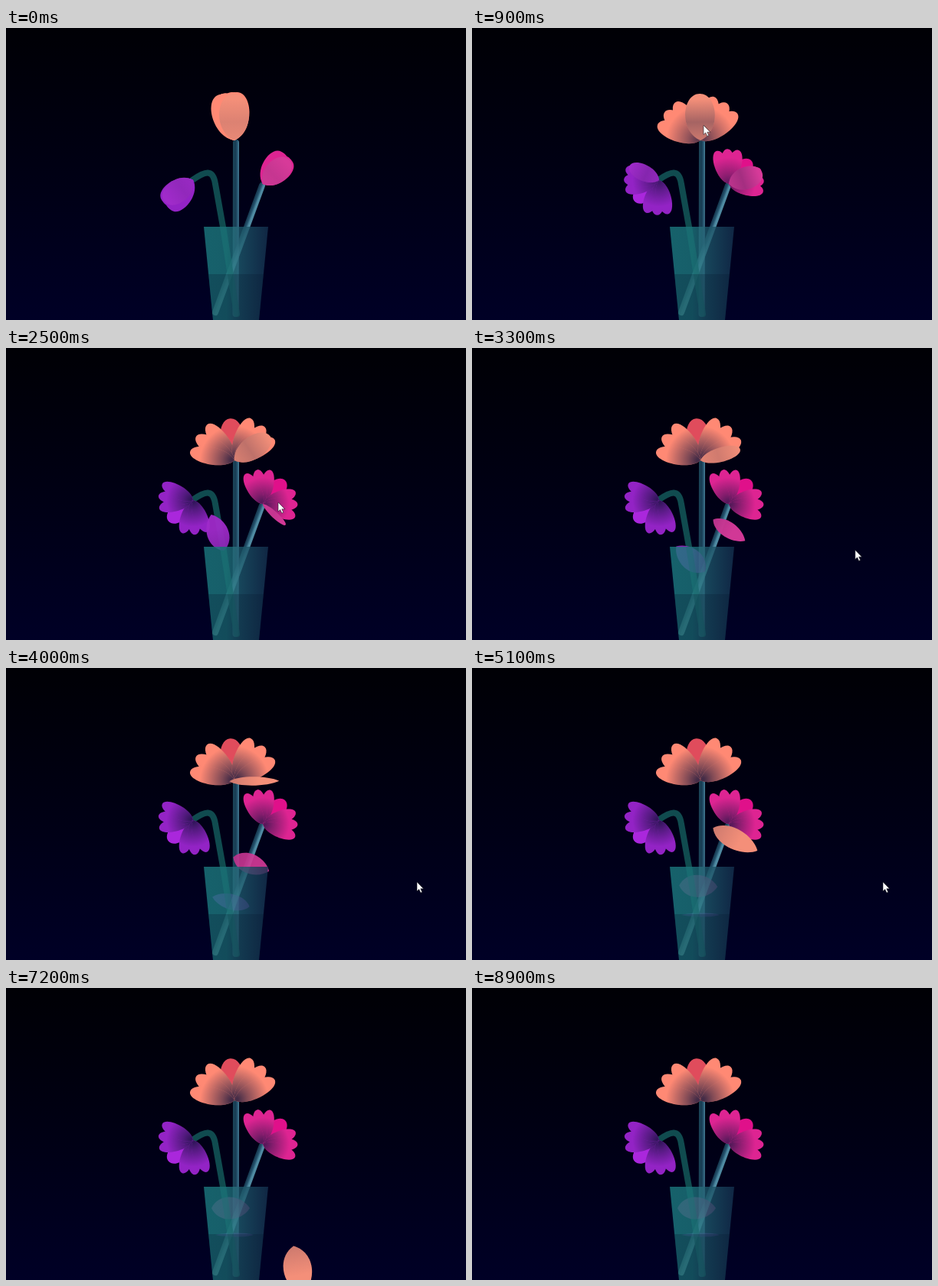
Write an HTML page with a canvas that moves like this. It is 600x382 px and loops after 9 s.

```html
<!DOCTYPE html>
<html lang="en">
<head>
<meta charset="utf-8">
<title>Flowers in a vase</title>
<style>
html, body { margin: 0; width: 100%; height: 100%; overflow: hidden; background: #000; }
canvas { display: block; }
</style>
</head>
<body>
<canvas id="stage" width="600" height="382"></canvas>
<script>
const ctx = document.getElementById('stage').getContext('2d');
const LOOP = 9000, STEP = 100, RAD = Math.PI / 180;
const clamp = v => Math.max(0, Math.min(1, v));
const mix = (a, b, p) => a + (b - a) * p;
const mixPoint = (a, b, p) => a.map((v, i) => mix(v, b[i], p));

// fall: centre and tilt at both ends; turns: half turns about the petal's long axis
const FLOWERS = [
  {
    x: 244, y: 199, axis: -133, size: .77,
    rgb: '147,35,197', back: '#aa27dc', bud: '#a02bca', dark: '42,20,82',
    fall: { from: [262, 190, 25], to: [298, 323, -90], time: 3100, turns: 1 }
  },
  {
    x: 335, y: 204, axis: 41, size: .77,
    rgb: '222,36,146', back: '#e0108a', bud: '#d73a99', dark: '72,24,84',
    fall: { from: [351, 220, 136], to: [293, 288, 90], time: 2600, turns: .5 }
  },
  {
    x: 298, y: 147, axis: -8, size: 1,
    rgb: '255,137,116', back: '#e04c5c', bud: '#f48f79', dark: '48,34,66',
    fall: { from: [322, 141, 87], to: [395, 425, 190], time: 4100, turns: .5 }
  }
];
// The flowers shed their front petals one after the other.
FLOWERS.forEach((f, i) => {
  f.loosen = 300 * (i + 1);
  f.release = 1300 * (i + 1);
});

const POINTER = [
  { t: 500, at: [302, 127] }, { t: 1400, at: [302, 128] }, { t: 2500, at: [355, 202] },
  { t: 3500, at: [536, 280] }, { t: 5600, at: [536, 280] }, { t: 6200, at: [327, 181] },
  { t: 6800, at: [34, 60] }, { t: 7100, at: [115, 5] }
];

function linear(x0, y0, x1, y1, ...stops) {
  const g = ctx.createLinearGradient(x0, y0, x1, y1);
  stops.forEach(([at, color]) => g.addColorStop(at, color));
  return g;
}

function petal(angle, w, len, tip, ...fills) {
  ctx.save();
  ctx.rotate(angle * RAD);
  ctx.beginPath();
  ctx.moveTo(0, 0);
  ctx.bezierCurveTo(-w * .72, -len * .2, -w * .6, -len * tip, 0, -len);
  ctx.bezierCurveTo(w * .6, -len * tip, w * .72, -len * .2, 0, 0);
  for (const fill of fills) {
    ctx.fillStyle = fill;
    ctx.fill();
  }
  ctx.restore();
}

function flower(f, t) {
  const open = 1 - Math.pow(1 - clamp(t / 1800), 2.7);
  const spread = mix(.16, 1, open);
  const w = mix(35, 23, open), len = mix(63, 59, open);
  ctx.save();
  ctx.translate(f.x, f.y);
  ctx.scale(f.size, f.size);
  ctx.rotate(f.axis * RAD);

  petal(2, 31, 55, 1, f.back);
  const glow = ctx.createRadialGradient(0, -3, 2, 0, -3, 42);
  glow.addColorStop(0, `rgba(${f.dark},${.9 * open})`);
  glow.addColorStop(.3, `rgba(${f.dark},${.6 * open})`);
  glow.addColorStop(1, `rgba(${f.dark},0)`);
  for (let i = 0; i < 3; i++) {
    for (const side of [-1, 1]) {
      petal(side * (29 + 21 * i) * spread, w, len, 1, `rgb(${f.rgb})`, glow);
    }
  }

  if (t < f.release) {
    const p = clamp((t - f.loosen) / (f.release - f.loosen));
    const a = .12 + .33 * open * (1 - p);
    const shade = linear(0, 0, 0, -60,
      [0, `rgba(${f.dark},${a * .5})`], [.4, `rgba(${f.dark},${a})`], [.9, `rgba(${f.dark},0)`]);
    petal(mix(7, 95, Math.pow(p, .7)), 39 * (1 - .8 * p * p), mix(61, 52, p), 1, f.bud, shade);
  }
  ctx.restore();
}

function fallingPetal(f, t) {
  if (t < f.release) return;
  const { from, to, time, turns } = f.fall;
  const p = clamp((t - f.release) / time);
  const [x, y, tilt] = mixPoint(from, to, p);
  const w = mix(5, 38 * f.size, Math.sqrt(Math.abs(Math.sin(p * turns * Math.PI))));
  const len = 65 * f.size;
  ctx.save();
  ctx.globalAlpha = f.size < 1 ? mix(1, .65, p * p) : 1;
  ctx.translate(x, y);
  ctx.rotate(tilt * RAD);
  ctx.translate(0, len / 2);
  petal(0, w, len, .78, f.bud,
    linear(0, 0, 0, -len, [0, `rgba(${f.dark},.2)`], [.6, `rgba(${f.dark},0)`]));
  ctx.restore();
}

function line(style, draw) {
  ctx.beginPath();
  draw();
  ctx.strokeStyle = style;
  ctx.lineWidth = 8;
  ctx.lineCap = 'round';
  ctx.stroke();
}

const bentStem = () => {
  ctx.moveTo(243, 199);
  ctx.bezierCurveTo(260, 187, 270, 184, 273, 204);
  ctx.lineTo(283, 260);
  ctx.lineTo(301, 374);
};
const leanStem = () => { ctx.moveTo(334, 206); ctx.lineTo(273, 372); };
const tallStem = () => { ctx.moveTo(300, 150); ctx.lineTo(299.5, 374); };

function stems() {
  const tones = [[0, '#1b4558'], [.45, '#183c54'], [.75, '#285873'], [1, '#4f8aa1']];
  line(linear(296, 0, 304, 0, ...tones), tallStem);
  line(linear(299, 280, 307, 283, ...tones), leanStem);
  line('#104b4f', bentStem);
}

function vasePath(top) {
  const inset = (top - 260) * 12 / 122;
  ctx.beginPath();
  ctx.moveTo(258 + inset, top);
  ctx.lineTo(342 - inset, top);
  ctx.lineTo(330, 382);
  ctx.lineTo(270, 382);
  ctx.closePath();
}

function vase() {
  vasePath(260);
  ctx.fillStyle = linear(258, 0, 342, 0,
    [0, 'rgba(28,122,127,.8)'], [.35, 'rgba(28,118,124,.8)'], [.55, 'rgba(29,88,106,.8)'], [1, 'rgba(20,48,78,.8)']);
  ctx.fill();

  ctx.save();
  ctx.clip();
  line(linear(0, 260, 0, 374, [0, 'rgba(60,150,155,.08)'], [1, 'rgba(75,160,160,.38)']), leanStem);
  line('rgba(80,150,165,.15)', tallStem);
  line('rgba(24,104,108,.4)', bentStem);
  ctx.restore();

  vasePath(322);
  ctx.fillStyle = 'rgba(8,26,50,.27)';
  ctx.fill();
}

function pointer(t) {
  const i = POINTER.findIndex(k => t <= k.t);
  if (i < 0 || t < POINTER[0].t) return;
  const b = POINTER[i], a = POINTER[Math.max(0, i - 1)];
  ctx.save();
  ctx.translate(...mixPoint(a.at, b.at, clamp((t - a.t) / (b.t - a.t || 1))));
  ctx.beginPath();
  [[0, 0], [0, 12], [2.7, 9.5], [4.8, 14], [6.8, 13.2], [4.8, 8.8], [8.5, 8.8]]
    .forEach(([x, y]) => ctx.lineTo(x, y));
  ctx.closePath();
  ctx.fillStyle = '#fff';
  ctx.fill();
  ctx.strokeStyle = 'rgba(20,20,30,.8)';
  ctx.lineWidth = .7;
  ctx.stroke();
  ctx.restore();
}

function draw(t) {
  const [purple, pink, coral] = FLOWERS;
  ctx.fillStyle = linear(0, 0, 0, 382, [0, '#000005'], [.5, '#000014'], [1, '#000026']);
  ctx.fillRect(0, 0, 600, 382);
  stems();
  FLOWERS.forEach(f => flower(f, t));
  fallingPetal(purple, t);
  fallingPetal(pink, t);
  vase();
  fallingPetal(coral, t);
  pointer(t);
}

const start = performance.now();
function tick() {
  const t = (performance.now() - start) % LOOP;
  draw(Math.floor(t / STEP) * STEP);
  requestAnimationFrame(tick);
}
tick();
</script>
</body>
</html>
```
